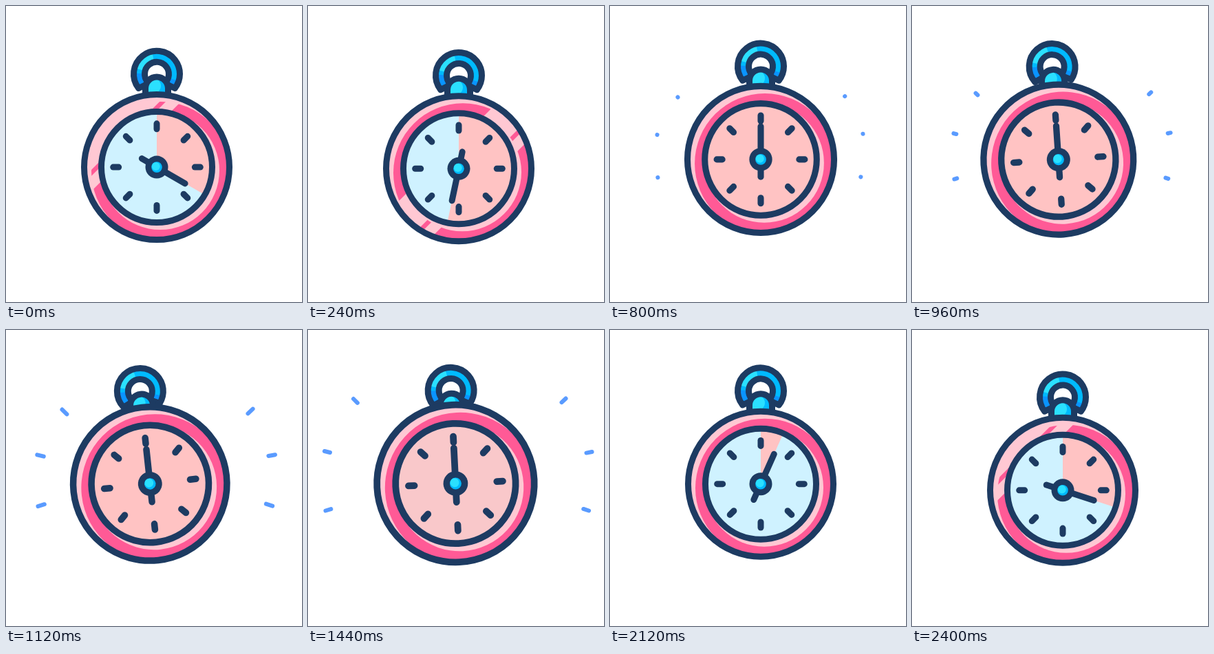
An HTML page with a canvas for the animation above (2440 ms loop, 430 by 430 pixels).

```html
<!DOCTYPE html>
<html lang="en">
<head>
<meta charset="utf-8">
<title>Stopwatch</title>
<style>
  html, body { margin: 0; width: 100%; height: 100%; overflow: hidden; background: #fff; }
  canvas { display: block; width: 430px; height: 430px; }
</style>
</head>
<body>
<canvas id="stage" width="430" height="430"></canvas>
<script>
const ctx = document.getElementById('stage').getContext('2d');
const LOOP = 2440, STEP = 40, LEAD_IN = 400;
const TAU = Math.PI * 2, DEG = Math.PI / 180;
const CENTER_X = 219, REST_Y = 222.9, PIVOT_Y = 314;
const NAVY = '#1d3b62', HOT = '#ff5a96', PALE = '#ffc8d3', SPARK = '#5a9bff';
const DIAL = '#cff2ff', SECTOR = '#ffc3c3';
const BLUE = '#00baff', CYAN = '#2be0ff', DEEP = '#0a94ff';

// Outer end and direction (degrees) of each spark
const SPARKS = [
  [66, 100, 225], [24, 176, 194], [25.5, 262.5, 163],
  [374.5, 99.5, -43.5], [412.5, 177, -11], [408, 262.5, 18]
];

const clamp = v => Math.min(1, Math.max(0, v));
const ease = (t, from, to) => {
  const p = clamp((t - from) / (to - from));
  return p * p * (3 - 2 * p);
};

function disc(x, y, r, color) {
  ctx.beginPath();
  ctx.arc(x, y, r, 0, TAU);
  ctx.fillStyle = color;
  ctx.fill();
}

function circle(r) {
  ctx.beginPath();
  ctx.arc(0, 0, r, 0, TAU);
}

function outline(color = NAVY, width = 9) {
  ctx.strokeStyle = color;
  ctx.lineWidth = width;
  ctx.stroke();
}

function line(x1, y1, x2, y2, color, width) {
  ctx.beginPath();
  ctx.moveTo(x1, y1);
  ctx.lineTo(x2, y2);
  outline(color, width);
}

function group(draw) {
  ctx.save();
  draw();
  ctx.restore();
}

function wedge(r, from, to, color) {
  ctx.beginPath();
  ctx.moveTo(0, 0);
  ctx.arc(0, 0, r, from * DEG, to * DEG);
  ctx.closePath();
  ctx.fillStyle = color;
  ctx.fill();
}

function drawLoop() {
  const path = () => {
    ctx.beginPath();
    ctx.arc(0, 0, 33.5, 142 * DEG, 398 * DEG);
    ctx.arc(0, 0, 17.5, 410 * DEG, 130 * DEG, true);
    ctx.closePath();
  };
  group(() => {
    ctx.translate(0, -135.3);
    group(() => {
      path();
      ctx.clip();
      disc(0, 0, 40, BLUE);
      wedge(40, 195, 258, CYAN);
      wedge(40, 130, 182, DEEP);
      wedge(40, 18, 60, DEEP);
    });
    path();
    outline();
  });
}

function drawPost() {
  const path = () => {
    ctx.beginPath();
    ctx.moveTo(-16.5, -98);
    ctx.lineTo(-16.5, -114.5);
    ctx.arc(0, -114.5, 16.5, Math.PI, TAU);
    ctx.lineTo(16.5, -98);
    ctx.closePath();
  };
  group(() => {
    path();
    ctx.clip();
    ctx.fillStyle = BLUE;
    ctx.fillRect(-20, -135, 40, 40);
    disc(-5, -118, 11, CYAN);
  });
  path();
  outline();
}

// Diagonal pale stripe; edges are measured as x + y from the watch centre
function stripe(from, to) {
  ctx.fillStyle = PALE;
  ctx.fillRect(from / Math.SQRT2, -150, (to - from) / Math.SQRT2, 300);
}

function drawCase(u) {
  group(() => {
    circle(105.5);
    ctx.clip();
    disc(0, 0, 106, PALE);
    disc(6, 6, 101, HOT);
    disc(5, 5, 86, PALE);
    const shift = (u - LEAD_IN) * 0.5;
    ctx.rotate(Math.PI / 4);
    stripe(shift - 160, shift - 91);
    stripe(shift - 82, shift - 60);
  });
  circle(105.5);
  outline();
}

function drawDial(u) {
  const angle = 360 * clamp(u / 1200);
  disc(0, 0, 80.5, DIAL);
  group(() => {
    ctx.globalAlpha = 1 - ease(u, 1680, 2400);
    wedge(80.5, -90, angle - 90, SECTOR);
  });
  circle(80.5);
  outline();
  for (let i = 0; i < 8; i++) {
    group(() => {
      ctx.rotate(i * Math.PI / 4);
      line(0, -55.3, 0, -63.3, NAVY, 9);
    });
  }
  group(() => {
    ctx.rotate(angle * DEG);
    line(0, 25, 0, -47.5, NAVY, 9);
  });
  disc(0, 0, 16.5, NAVY);
  disc(0, 0, 7.8, BLUE);
  disc(-1.2, -1.2, 6, CYAN);
}

function drawSparks(u) {
  const outer = -46 * (1 - ease(u, 1180, 1840));
  const inner = -46 * (1 - ease(u, 1190, 2080));
  if (outer - inner < 0.1) return;
  for (const [x, y, dir] of SPARKS) {
    const dx = Math.cos(dir * DEG), dy = Math.sin(dir * DEG);
    line(x + dx * inner, y + dy * inner, x + dx * outer, y + dy * outer, SPARK, 6);
  }
}

function shakeAngle(u) {
  const t = u - 1200;
  if (t <= 0 || t >= 880) return 0;
  return 6.3 * Math.sin(TAU * t / 179) * clamp((880 - t) / 80);
}

function render(time) {
  const u = (time + LEAD_IN) % LOOP;
  const dip = 14 * (ease(u, 0, 560) - ease(u, 560, 1200));
  const swell = 1 + 0.0845 * (ease(u, 1040, 1800) - ease(u, 1800, 2400));

  ctx.fillStyle = '#fff';
  ctx.fillRect(0, 0, 430, 430);
  ctx.lineCap = ctx.lineJoin = 'round';

  drawSparks(u);
  group(() => {
    ctx.translate(CENTER_X, PIVOT_Y);
    ctx.rotate(shakeAngle(u) * DEG);
    ctx.translate(0, REST_Y - PIVOT_Y + dip);
    drawLoop();
    drawPost();
    ctx.scale(swell, swell);
    drawCase(u);
    drawDial(u);
  });
}

const start = performance.now();
function tick() {
  const elapsed = (performance.now() - start) % LOOP;
  render(Math.floor(elapsed / STEP) * STEP);
  requestAnimationFrame(tick);
}
tick();
</script>
</body>
</html>
```
